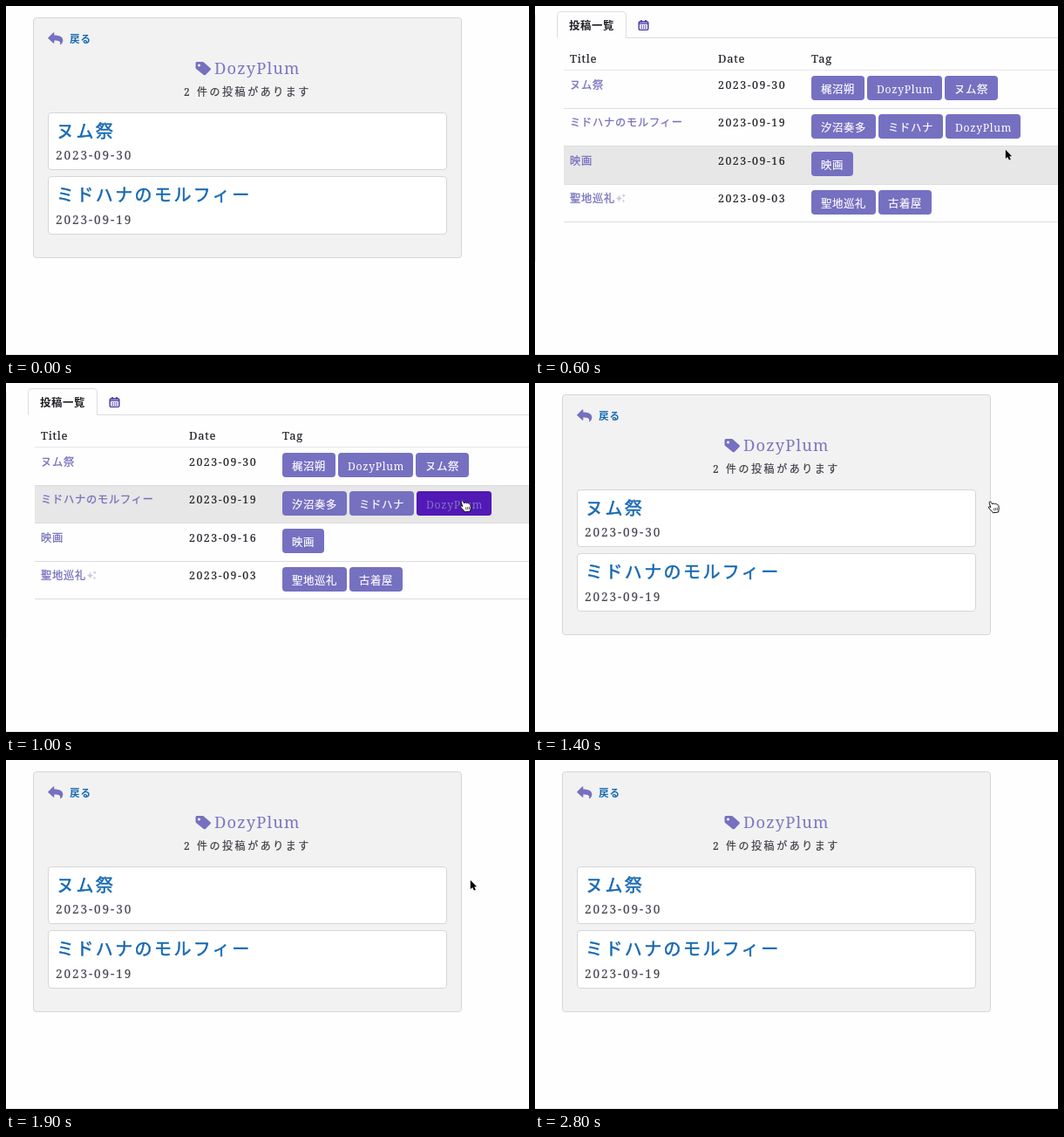
These frames come from a looping animation (600x400 px, 3 s). An HTML page:

```html
<!DOCTYPE html>
<html lang="ja">
<head>
<meta charset="utf-8">
<title>投稿一覧</title>
<style>
html, body { margin: 0; width: 100%; height: 100%; overflow: hidden; background: #fefefe; }
svg { display: block; width: 600px; height: 400px; }
text { font: 400 13px "Noto Serif", "Noto Sans CJK JP", "Noto Sans CJK", serif; fill: #1f1d24; white-space: pre; }

.line { fill: none; stroke: #dcdde0; }
.box { stroke: #d6d6d8; }
.violet { fill: #7670c1; }

.back { font-size: 11.6px; font-weight: 700; letter-spacing: .9px; fill: #146bb3; }
.heading { font-size: 18.4px; letter-spacing: 1.1px; fill: #7c76c0; }
.count { font-size: 12px; letter-spacing: 2.55px; fill: #3f3d45; stroke: #3f3d45; stroke-width: .2px; }
.post { font-size: 20px; letter-spacing: 2.4px; fill: #1668b2; stroke: #1668b2; stroke-width: .5px; }
.day { font-size: 13.6px; letter-spacing: 1.9px; fill: #484650; stroke: #484650; stroke-width: .15px; }

.tab { font-size: 12.4px; font-weight: 700; letter-spacing: .6px; }
.head { letter-spacing: .7px; stroke: #1f1d24; stroke-width: .15px; }
.link { font-size: 12.2px; letter-spacing: .8px; fill: #7771bd; stroke: #7771bd; stroke-width: .3px; }
.date { font-size: 12.4px; letter-spacing: 1.5px; stroke: #1f1d24; stroke-width: .15px; }
.tag rect { height: 28px; rx: 4px; fill: #7670c1; }
.tag text { font-size: 12.4px; letter-spacing: .6px; fill: #fff; stroke: #fff; stroke-width: .2px; }
.tag .en { font-size: 12.2px; letter-spacing: .7px; stroke: none; }
.tag.on rect { fill: #5119b5; }
.tag.on text { fill: #8272cb; }

/* one tick of 100 ms = 3.3333% of the loop */
.anim { animation: 3s step-end infinite; }
#detail { animation-name: detail; }
#list { animation-name: list; }
#hover { animation-name: hover; }
#active { animation-name: active; }
#pointer { animation-name: move; }
#arrow { animation-name: arrow; }
#hand { animation-name: hand; }

@keyframes detail {
  0%, 46.6667% { visibility: visible; }
  3.3333% { visibility: hidden; }
}
@keyframes list {
  0%, 46.6667% { visibility: hidden; }
  3.3333% { visibility: visible; }
}
@keyframes hover {
  0%, 46.6667% { visibility: hidden; transform: none; }
  16.6667% { visibility: visible; transform: translateY(87px); }
  20% { visibility: visible; transform: translateY(43px); }
  23.3333% { visibility: visible; transform: none; }
}
@keyframes active {
  0%, 46.6667% { visibility: hidden; }
  23.3333% { visibility: visible; }
}
@keyframes move {
  0% { transform: translate(436px, 350px); }
  13.3333% { transform: translate(466px, 283px); }
  16.6667% { transform: translate(512px, 222px); }
  20% { transform: translate(539px, 164px); }
  23.3333% { transform: translate(541px, 147px); }
  26.6667% { transform: translate(532px, 139px); }
  30% { transform: translate(525px, 135px); }
  46.6667% { transform: translate(524px, 136px); }
  56.6667% { transform: translate(526px, 136px); }
  60% { transform: translate(529px, 136px); }
  63.3333% { transform: translate(532px, 137px); }
  66.6667% { transform: translate(535px, 137px); }
  70% { transform: translate(540px, 137px); }
  73.3333% { transform: translate(571px, 138px); }
}
@keyframes arrow {
  0%, 23.3333%, 76.6667% { visibility: hidden; }
  6.6667%, 53.3333% { visibility: visible; }
}
@keyframes hand {
  0%, 53.3333% { visibility: hidden; }
  23.3333% { visibility: visible; }
}
</style>
</head>
<body>
<svg viewBox="0 0 600 400">
  <path d="M0 399.5H600" stroke="#e6e6e6"/>

  <g id="detail" class="anim">
    <rect class="box" x="31.5" y="13.5" width="491" height="275" rx="3.5" fill="#f2f2f2"/>
    <path class="violet" transform="translate(48 30)" d="M.4 6.2 6.2.6Q7.3-.2 7.3 1V3.6C13.5 3.7 17.3 5.4 17.3 9.6C17.3 11.8 16 13.6 14.6 14.3Q13.8 14.5 14 13.7C15.1 10.4 12.5 9.4 7.3 9.4V12.2Q7.3 13.4 6.2 12.6L.4 7.2Q-.1 6.7.4 6.2Z"/>
    <text class="back" x="73" y="42">戻る</text>
    <path class="violet" fill-rule="evenodd" transform="translate(217.5 64)" d="M1.5 0H8Q8.8 0 9.4.6L17 7.3Q18 8.3 17 9.3L11.4 14.9Q10.3 15.8 9.2 14.9L.6 8Q0 7.4 0 6.6V1.5Q0 0 1.5 0ZM4 2.4a1.6 1.6 0 1 0 .01 0Z"/>
    <text class="heading" x="239" y="78">DozyPlum</text>
    <text class="count" x="204" y="102.5">2 件の投稿があります</text>
    <g class="box" fill="#fff">
      <rect x="48.5" y="122.5" width="457" height="65" rx="3.5"/>
      <rect x="48.5" y="195.5" width="457" height="66" rx="3.5"/>
    </g>
    <text class="post" x="58" y="151">ヌム祭</text>
    <text class="day" x="57" y="176">2023-09-30</text>
    <text class="post" x="58" y="224">ミドハナのモルフィー</text>
    <text class="day" x="57" y="249.5">2023-09-19</text>
  </g>

  <g id="list" class="anim">
    <path d="M.5 10V293" stroke="#ececec"/>
    <rect id="hover" class="anim" x="33" y="118" width="567" height="43" fill="#e7e7e7"/>
    <path class="line" d="M25.5 36.5V10.5Q25.5 6.5 29.5 6.5H100.5Q104.5 6.5 104.5 10.5V36.5H600"/>
    <path class="line" d="M33 73.5H600" stroke-opacity=".7"/>
    <path class="line" d="M33 117.5H600M33 160.5H600M33 204.5H600M33 247.5H600"/>

    <text class="tab" x="39" y="26.5">投稿一覧</text>
    <g transform="translate(118.5 16)" fill="none" stroke="#43309f">
      <rect x=".7" y="2" width="10.6" height="9.4" rx="1.3" stroke-width="1.4"/>
      <path d="M3.5 0V2.5M8.5 0V2.5" stroke-width="1.5"/>
      <path d="M1 4.2H11" stroke-width="1.3"/>
      <path d="M2.8 6.8H9.5M2.8 9.2H9.5" stroke-width="1.3" stroke-dasharray="1.5 1"/>
    </g>

    <text class="head" x="40" y="64.5">Title</text>
    <text class="head" x="210" y="64.5">Date</text>
    <text class="head" x="317" y="64.5">Tag</text>

    <g>
      <text class="link" x="40" y="94.5">ヌム祭</text>
      <text class="date" x="210" y="94.5">2023-09-30</text>
      <g class="tag" transform="translate(317 80)"><rect width="61"/><text x="11" y="19.5">梶沼朔</text></g>
      <g class="tag" transform="translate(381 80)"><rect width="86"/><text class="en" x="11" y="19.5">DozyPlum</text></g>
      <g class="tag" transform="translate(470 80)"><rect width="61"/><text x="11" y="19.5">ヌム祭</text></g>
    </g>
    <g transform="translate(0 44)">
      <text class="link" x="40" y="94">ミドハナのモルフィー</text>
      <text class="date" x="210" y="94">2023-09-19</text>
      <g class="tag" transform="translate(317 80)"><rect width="74"/><text x="11" y="19.5">汐沼奏多</text></g>
      <g class="tag" transform="translate(394 80)"><rect width="74"/><text x="11" y="19.5">ミドハナ</text></g>
      <g class="tag" transform="translate(471 80)"><rect width="86"/><text class="en" x="11" y="19.5">DozyPlum</text></g>
      <g id="active" class="anim">
        <g class="tag on" transform="translate(471 80)"><rect width="86"/><text class="en" x="11" y="19.5">DozyPlum</text></g>
      </g>
    </g>
    <g transform="translate(0 87)">
      <text class="link" x="40" y="94.5">映画</text>
      <text class="date" x="210" y="94.5">2023-09-16</text>
      <g class="tag" transform="translate(317 80)"><rect width="48"/><text x="11" y="19.5">映画</text></g>
    </g>
    <g transform="translate(0 131)">
      <text class="link" x="40" y="94">聖地巡礼</text>
      <path fill="#cfcdd6" d="M96.5 85Q97 89 100.5 89.5Q97 90 96.5 94Q96 90 92.5 89.5Q96 89 96.5 85ZM101.8 84Q102 86 104 86.2Q102 86.4 101.8 88.4Q101.6 86.4 99.6 86.2Q101.6 86 101.8 84ZM101.5 90.5Q101.7 92.3 103.5 92.5Q101.7 92.7 101.5 94.5Q101.3 92.7 99.5 92.5Q101.3 92.3 101.5 90.5Z"/>
      <text class="date" x="210" y="94">2023-09-03</text>
      <g class="tag" transform="translate(317 80)"><rect width="74"/><text x="11" y="19.5">聖地巡礼</text></g>
      <g class="tag" transform="translate(394 80)"><rect width="61"/><text x="11" y="19.5">古着屋</text></g>
    </g>
  </g>

  <g id="pointer" class="anim" stroke-linejoin="round">
    <path id="arrow" class="anim" d="M.8.8V11L3.2 8.9 4.9 12.6 6.8 11.8 5.2 8.2H8.2Z" fill="#000" stroke="#fff" stroke-width="1" paint-order="stroke"/>
    <g id="hand" class="anim">
      <path d="M-2.8 1.6Q-3.2.1-1.8 0Q-.8 0-.3 1.1L.6 3Q1.2 1.6 2.4 2Q3.2 2.1 3.5 3Q4.2 2 5.2 2.5Q6 2.8 6.3 3.7Q7.4 3.2 7.8 4.6Q8.6 7.4 8 9.6L7.6 12 1.4 12.8.4 11.2Q-2 9.6-3.4 7Q-3.8 5.6-2.6 5.6L-1.2 6.6Z" fill="#fff" stroke="#111"/>
      <path d="M2.4 7.4 3 10.4M4.3 7 4.8 10M6.2 6.7 6.5 9.7" fill="none" stroke="#111" stroke-width=".7"/>
    </g>
  </g>
</svg>
</body>
</html>
```
